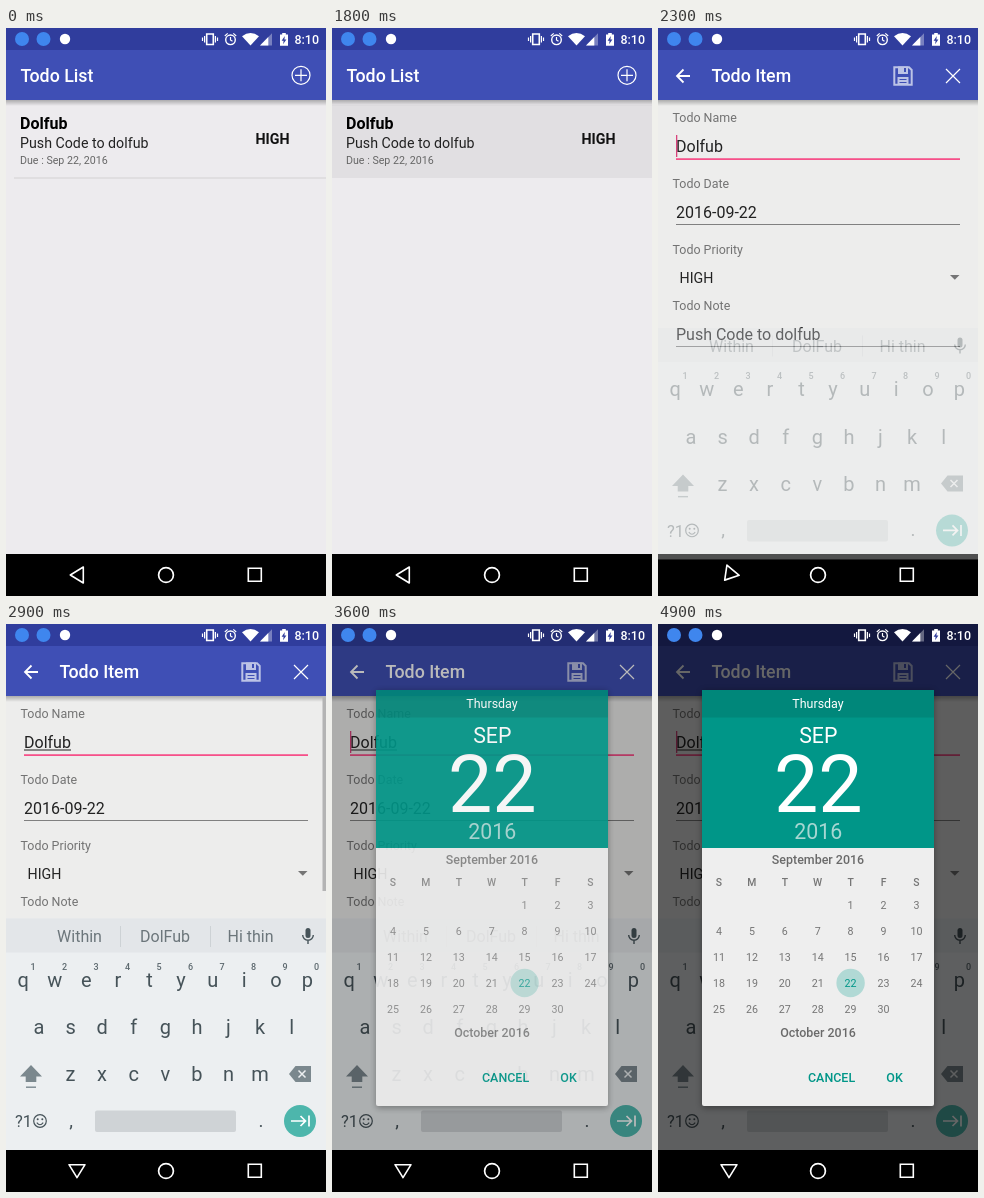
Recreate the animation shown at these times as an HTML page. Size 320 by 568 pixels, loop 5 s.

```html
<!DOCTYPE html>
<html lang="en">
<head>
<meta charset="utf-8">
<title>Todo app</title>
<style>
html, body { margin: 0; width: 100%; height: 100%; overflow: hidden; background: #000; }
svg { display: block; width: 100vw; height: 100vh; }
text { font-family: Roboto, "Noto Sans", sans-serif; white-space: pre; }
</style>
</head>
<body>
<svg id="stage" viewBox="0 0 320 568"></svg>
<script>
const LOOP = 5000, STEP = 100;
const INK = '#222', GREY = '#757575', TEAL = '#009688', PINK = '#f8407f', KEY = '#465359';

const rect = (x, y, w, h, fill, more = '') =>
  `<rect x="${x}" y="${y}" width="${w}" height="${h}" fill="${fill}" ${more}/>`;
const disc = (x, y, r, fill, more = '') =>
  `<circle cx="${x}" cy="${y}" r="${r}" fill="${fill}" ${more}/>`;
const fillPath = (d, fill, more = '') => `<path d="${d}" fill="${fill}" ${more}/>`;
const line = (d, color, w, more = '') =>
  `<path d="${d}" fill="none" stroke="${color}" stroke-width="${w}" ${more}/>`;
const text = (x, y, s, size, fill = INK, weight = 400, anchor = 'start') =>
  `<text x="${x}" y="${y}" font-size="${size}" fill="${fill}" font-weight="${weight}" text-anchor="${anchor}">${s}</text>`;
const mid = (x, y, s, size, fill, weight) => text(x, y, s, size, fill, weight, 'middle');
const group = (id, body, more = '') => `<g id="${id}" ${more}>${body}</g>`;

const appFrame = (bg, title, x) =>
  rect(0, 0, 320, 568, '#000') + rect(0, 71, 320, 455, bg) +
  rect(0, 71, 320, 7, 'url(#shade)') +
  rect(0, 0, 320, 22, '#303d9d') + rect(0, 22, 320, 50, '#3f4fb5') +
  text(x, 54.3, title, 17.78, '#fff', 500);

function listScreen() {
  return appFrame('#edebee', 'Todo List', 14.5) +
    disc(295, 47.3, 9, 'none', 'stroke="#fff" stroke-width="1.2"') +
    line('M289 47.3H301M295 41.3V53.3', '#fff', 1.2) +
    group('press', rect(0, 77, 320, 73, '#000')) +
    text(14, 100.5, 'Dolfub', 16, '#000', 700) +
    text(14, 119.7, 'Push Code to dolfub', 14.22) +
    text(14, 135.6, 'Due : Sep 22, 2016', 10.67, '#666') +
    text(249.5, 116.4, 'HIGH', 14.22, '#111', 700) +
    group('divider', rect(8, 149.5, 312, 1, '#d3d2d4'));
}

function saveIcon() {
  const c = '#bcc3e6';
  return line('M236.3 39.3H251L253.7 42V56.7H236.3Z', c, 2) +
    fillPath('M240 38.5H250V46H240Z', c) + rect(246, 40, 2, 4, '#3f4fb5') +
    rect(239.5, 49, 11, 8, c) + line('M241.5 51.5H248.5M241.5 54.5H248.5', '#3f4fb5', 1);
}

function itemScreen() {
  const label = (y, s) => text(14.5, y, s, 12.44, '#737373');
  const rule = y => rect(18, y, 284, 1, '#808080');
  return appFrame('#ededec', 'Todo Item', 53.5) +
    line('M32 48H19.5M25.5 41.5L19 48L25.5 54.5', '#fff', 1.8) +
    saveIcon() +
    line('M288 41L302 55M302 41L288 55', '#fff', 1.2) +
    label(94.3, 'Todo Name') + text(18, 124, 'Dolfub', 16) +
    group('compose', rect(18, 125.5, 47, 1, INK)) +
    group('cursor', rect(18, 107, 1.3, 22, '#d8437c')) +
    rect(18, 130.3, 284, 1.6, PINK) +
    label(160.3, 'Todo Date') + text(18, 190, '2016-09-22', 16) + rule(196) +
    label(226.4, 'Todo Priority') + text(21.5, 254.5, 'HIGH', 14.22) +
    fillPath('M292 247H301.5L296.8 251.8Z', GREY) +
    label(282.4, 'Todo Note') + text(18, 312.2, 'Push Code to dolfub', 16) + rule(318) +
    group('scrollbar', rect(316.5, 72, 3.5, 195, '#b4b4b4'));
}

function keyboard() {
  const row = (keys, x, y) => [...keys].map((k, i) => mid(x + i * 31.58, y, k, 20, KEY)).join('');
  const hints = [...'1234567890'].map((k, i) => mid(27 + i * 31.5, 345.5, k, 9, '#5d696f', 500)).join('');
  const word = (x, s) => mid(x, 318.3, s, 16, '#6c767b');
  const icon = '#7b888e';
  return rect(0, 294.5, 320, 231.5, '#eceff1') + rect(0, 294.5, 320, 34, '#e3e6e9') +
    word(73.5, 'Within') + word(159, 'DolFub') + word(244.5, 'Hi thin') +
    rect(114, 302, 1, 21, '#cdd2d5') + rect(204, 302, 1, 21, '#cdd2d5') +
    rect(299.5, 304, 5, 10, KEY, 'rx="2.5"') +
    line('M296.7 311A5.3 5.3 0 0 0 307.3 311M302 316.3V320', KEY, 1.4) +
    row('qwertyuiop', 17.2, 362.5) + hints +
    row('asdfghjkl', 33, 410.3) + row('zxcvbnm', 64.5, 457.3) +
    fillPath('M25 441L36 452.5H30.3V458H19.7V452.5H14Z', icon) + rect(20, 462.5, 10, 1.4, icon) +
    fillPath('M283 450L289.5 442H305V458H289.5Z', icon) +
    line('M292.5 446.5L299.5 453.5M299.5 446.5L292.5 453.5', '#eceff1', 1.5) +
    text(9, 503.3, '?1', 16.5, KEY) +
    disc(34, 497, 6.3, 'none', `stroke="${KEY}" stroke-width="1.2"`) +
    disc(31.7, 495.3, 1, KEY) + disc(36.3, 495.3, 1, KEY) +
    line('M30.8 498.6Q34 503 37.2 498.6', KEY, 1.1) +
    mid(65, 503, ',', 19, KEY) + mid(255, 503, '.', 19, KEY) +
    rect(89, 486.5, 141, 21.5, '#cfd3d6', 'rx="2"') +
    disc(294, 497, 16, '#4db6ac') +
    line('M285 497H299M294.5 492L299.5 497L294.5 502M303 491.5V502.5', '#fff', 1.7);
}

function calendar() {
  const col = i => 61 + i * 32.9;
  let out = mid(160, 240.4, 'September 2016', 12.44, '#6a6a6a', 500);
  [...'SMTWTFS'].forEach((d, i) => out += mid(col(i), 261.7, d, 10.4, GREY, 500));
  out += disc(192.6, 359, 14.2, '#b1d9d5');
  for (let d = 1; d <= 30; d++) {
    const n = d + 3, today = d === 22;
    out += mid(col(n % 7), 284.8 + Math.floor(n / 7) * 26.1, d, 10.67, today ? TEAL : GREY);
  }
  return out + mid(160, 413.4, 'October 2016', 12.44, '#6a6a6a', 500);
}

function dialog() {
  return rect(44, 67, 232, 417, '#000', 'rx="2" opacity=".35" filter="url(#blur)"') +
    rect(44, 66, 232, 416, '#eee', 'rx="2"') +
    rect(44, 66, 232, 158, TEAL) + rect(44, 66, 232, 27.5, '#00877a') +
    mid(160, 84.4, 'Thursday', 12.44, '#fff') +
    mid(160.3, 119.4, 'SEP', 21.33, '#fff') +
    mid(160.3, 188, '22', 79, '#fff') +
    mid(160.3, 215, '2016', 21.33, '#a6d7d2') +
    group('days', calendar()) +
    text(150, 458.2, 'CANCEL', 12.44, TEAL, 500) + text(228.3, 458.2, 'OK', 12.44, TEAL, 500);
}

function systemBars() {
  const w = '#fff';
  return disc(16, 11, 7, '#3f86ee') + disc(37.5, 11, 7, '#3f86ee') + disc(59, 11, 5.2, w) +
    line('M200.7 6H207.3V16.5H200.7Z', w, 1.6) +
    line('M198.6 8V14.5M209.4 8V14.5M196.5 9.5V13M211.5 9.5V13', w, 1.2) +
    disc(224.5, 11.8, 4.8, 'none', 'stroke="#fff" stroke-width="1.4"') +
    line('M224.5 9V12L226.5 13.3M218.8 8L221.7 5.4M230.2 8L227.3 5.4', w, 1.2) +
    fillPath('M236 8.2Q244.5 1.8 253 8.2L244.5 17.5Z', w) +
    fillPath('M254 17.5L266 5.3V17.5Z', w, 'opacity=".35"') + fillPath('M254 17.5L262.3 9V17.5Z', w) +
    fillPath('M274 6.5H276.2V5H279.8V6.5H282V17.8H274Z', w) +
    fillPath('M278.8 8L275.6 12.8H277.6L277.1 16.3L280.4 11.4H278.4Z', '#303d9d') +
    text(288.5, 15.6, '8:10', 12.44, w, 500) +
    group('back', line('M64.3 547L77.3 539V555Z', w, 1.6, 'stroke-linejoin="round"')) +
    disc(160, 547, 7.4, 'none', 'stroke="#fff" stroke-width="1.7"') +
    line('M242.3 540.3H255.3V553.3H242.3Z', w, 1.6);
}

document.getElementById('stage').innerHTML =
  `<defs>
    <linearGradient id="shade" x2="0" y2="1">
      <stop offset="0" stop-color="#000" stop-opacity=".32"/>
      <stop offset="1" stop-color="#000" stop-opacity="0"/>
    </linearGradient>
    <filter id="blur"><feGaussianBlur stdDeviation="3"/></filter>
  </defs>` +
  group('list', listScreen()) + group('item', itemScreen()) + group('keys', keyboard()) +
  group('dim', rect(0, 0, 320, 526, '#000')) + group('dialog', dialog()) +
  group('system', systemBars());

const part = id => document.getElementById(id);
const fade = (id, a) => {
  const s = part(id).style;
  s.opacity = a;
  s.display = a > 0 ? '' : 'none';
};
const move = (id, v) => part(id).setAttribute('transform', v);
const span = (t, start, length) => Math.min(1, Math.max(0, (t - start) / length));
const decel = (p, power) => 1 - (1 - p) ** power;

// Piecewise-linear track of [time, value] pairs
function track(t, points) {
  let [t0, v0] = points[0];
  for (const [t1, v1] of points) {
    if (t < t1) return v0 + (v1 - v0) * span(t, t0, t1 - t0);
    [t0, v0] = [t1, v1];
  }
  return v0;
}

const ENTER = 1872, KEYS_IN = 2250;

function draw(t) {
  fade('divider', t < 1400 ? 1 : 0);
  fade('press', track(t, [[1400, 0], [1800, 0.05]]));

  fade('item', decel(span(t, ENTER, 200), 4));
  move('item', `translate(0 ${45.4 * (1 - decel(span(t, ENTER, 350), 5))})`);
  fade('cursor', t < 2900 || t >= 3400 ? 1 : 0);
  fade('compose', t >= 2500 ? 1 : 0);
  fade('scrollbar', t < 2400 ? 0 : 1 - span(t, 2900, 250));

  fade('keys', span(t, KEYS_IN, 150));
  move('keys', `translate(0 ${23 * (1 - decel(span(t, KEYS_IN, 200), 5))})`);
  move('back', `rotate(${-90 * decel(span(t, 2200, 300), 2)} 71 547)`);

  fade('dim', track(t, [[3400, 0], [3500, 0.04], [3600, 0.27], [3700, 0.5], [3800, 0.6]]));
  fade('dialog', track(t, [[3400, 0], [3500, 0.6], [3600, 0.9], [3700, 1]]));
  fade('days', track(t, [[3400, 0.2], [3500, 0.4], [3600, 0.8], [3700, 1]]));
}

const begin = performance.now();
function tick() {
  const t = (performance.now() - begin) % LOOP;
  draw(Math.floor(t / STEP) * STEP);
  requestAnimationFrame(tick);
}
tick();
</script>
</body>
</html>
```
